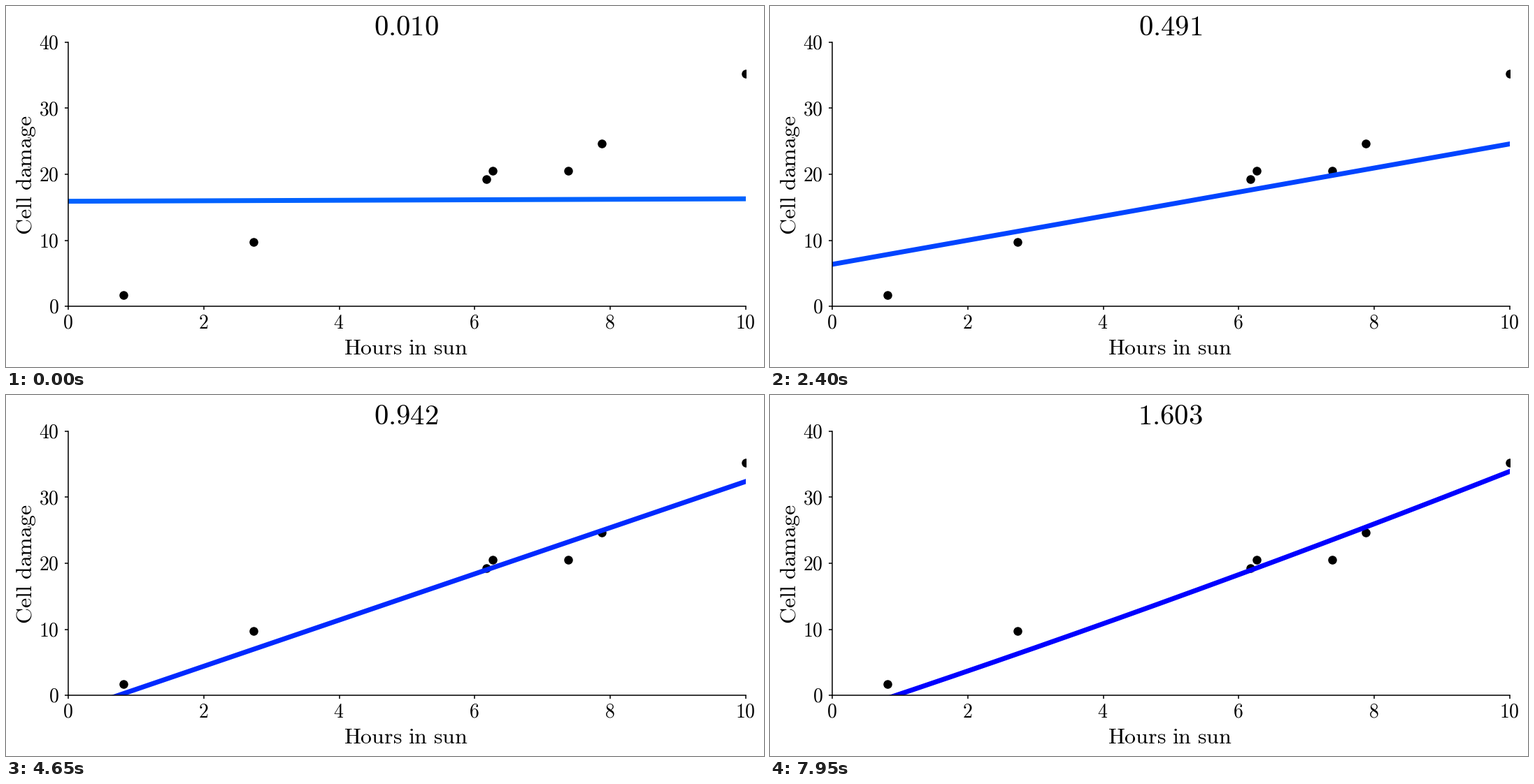
Recreate the animation shown at these times as a matplotlib script. Size 1084x517 px, loop 8 s.

```python
import numpy as np
import matplotlib.pyplot as plt
from matplotlib.animation import FuncAnimation

W, H, DPI = 1084, 517, 100
FRAMES, INTERVAL = 160, 50
LEFT, RIGHT, TOP, BOTTOM = 89, 1058, 52, 430

plt.rcParams.update({
    "mathtext.fontset": "cm",
    "axes.linewidth": 1.1,
    "xtick.major.width": 1.1,
    "ytick.major.width": 1.1,
})

fig = plt.figure(figsize=(W / DPI, H / DPI), dpi=DPI, facecolor="white")
ax = fig.add_axes([LEFT / W, 1 - BOTTOM / H,
                   (RIGHT - LEFT) / W, (BOTTOM - TOP) / H])
ax.set(xlim=(0, 10), ylim=(0, 40),
       xticks=range(0, 11, 2), yticks=range(0, 41, 10))
ax.tick_params(labelbottom=False, labelleft=False)
ax.spines[["top", "right"]].set_visible(False)


def roman(s):
    return r"$\mathrm{%s}$" % str(s).replace(" ", r"\ ")


def label(x, y, s, size, ha="center", **kw):
    """Place text by its baseline, in pixels from the top left."""
    return fig.text(x / W, 1 - y / H, roman(s), fontsize=size,
                    ha=ha, va="baseline", **kw)


for v in range(0, 11, 2):
    label(LEFT + (RIGHT - LEFT) * v / 10 - 0.7, 462, v, 20)
for v in range(0, 41, 10):
    label(76, BOTTOM - (BOTTOM - TOP) * v / 40 + 9.5, v, 20, ha="right")
label(572, 499, "Hours in sun", 23)
label(37, 242, "Cell damage", 23, rotation=90, rotation_mode="anchor")
title = label(572.3, 42, "0.010", 29.3)

hours = [0.815, 2.73, 6.17, 6.264, 7.379, 7.879, 10]
damage = [1.7, 9.74, 19.25, 20.55, 20.55, 24.65, 35.25]
ax.plot(hours, damage, "o", color="black", ms=8)

xs = np.linspace(0, 10, 201)
curve, = ax.plot(xs, np.zeros_like(xs), lw=5)

degrees = np.linspace(0, 5, 500)[1:]


def fit(x, degree):
    """Polynomial whose terms fade in one by one as the degree grows."""
    lin, quad = np.clip([degree, degree - 1], 0, 1)
    return (16.11 + lin * (3.717 * x - 19.87)
            + quad * 0.054 * (x - 2) * (x - 8))


def update(i):
    degree = degrees[i]
    curve.set_ydata(fit(xs, degree))
    curve.set_color((0, 98 / 255 * (1 - i / (FRAMES - 1)), 1))
    title.set_text(roman(f"{degree:.3f}"))
    return curve, title


anim = FuncAnimation(fig, update, frames=FRAMES, interval=INTERVAL,
                     repeat=True, repeat_delay=0)
plt.show()
```
